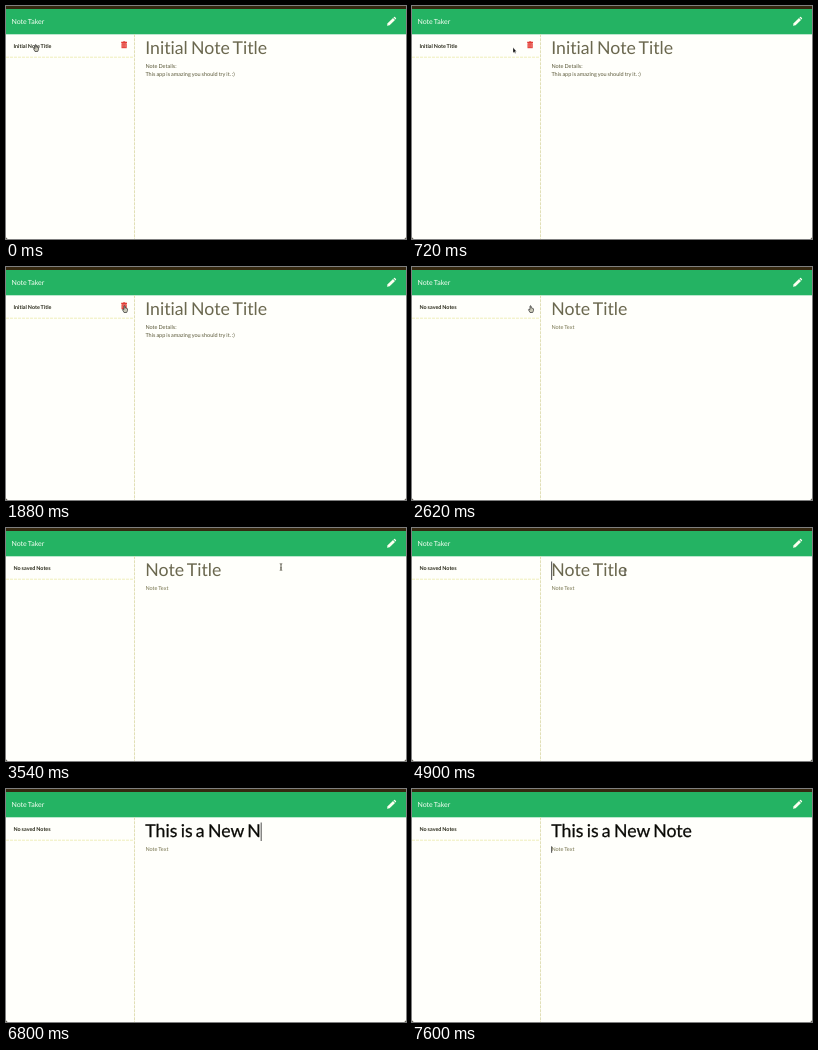
Animation, 400 px wide and 233 px high, one loop 8000 ms. Source, as an HTML page:

```html
<!DOCTYPE html>
<html lang="en">
<head>
<meta charset="utf-8">
<title>Note Taker</title>
<style>
  html, body { margin: 0; width: 100%; height: 100%; overflow: hidden; background: #fffffb; }
  svg { display: block; width: 100vw; height: 100vh; }
  text {
    font-family: Lato, sans-serif; font-variant-ligatures: none; white-space: pre;
    word-spacing: -.07em; text-rendering: geometricPrecision;
  }
  .brand { font-size: 7px; fill: #f6fff4; }
  .item { font-size: 5.4px; font-weight: 700; fill: #2b2b1c; }
  .title { font-size: 17.7px; fill: #6b684f; }
  .title.typed { fill: #0a0a06; stroke: #0a0a06; stroke-width: .25; }
  .body { font-size: 5.5px; fill: #5a5838; }
  .hint { fill: #77744f; }
  .caret { fill: #222; }
</style>
</head>
<body>
<svg viewBox="0 0 400 233" preserveAspectRatio="none">
  <rect width="400" height="233" fill="#1d1608"/>
  <path d="M0 3H400V231Q400 233 398 233H2Q0 233 0 231Z" fill="#fffffb"/>
  <rect width="400" height="3" fill="#352810"/>
  <rect y="3" width="400" height="25.3" fill="#24b363"/>
  <text class="brand" x="5.4" y="18.2">Note Taker</text>
  <g id="pencil" fill="#fcfff0">
    <path d="M381 19.8L381.6 17.2L387 11.9L389 13.9L383.6 19.2Z"/>
    <path d="M387.5 11.4L388 10.9Q388.5 10.5 389 11L389.9 11.9Q390.4 12.4 390 12.9L389.5 13.4Z"/>
  </g>

  <path d="M0 51.2H128" stroke="#efedb4" stroke-width=".9" stroke-dasharray="3 1"/>
  <path d="M128.5 28.3V233" stroke="#dedcae" stroke-width=".9" stroke-dasharray="3 1"/>
  <text class="item" id="item" x="7.5" y="41.6"></text>
  <g id="trash" fill="#e23a34">
    <path d="M115.2 35.8H117L117.4 35.2H119L119.4 35.8H121V37H115.2Z"/>
    <path d="M115.5 37.2H120.7V42.2H115.5Z"/>
    <path d="M116.8 38.2V41.4M118.1 38.2V41.4M119.4 38.2V41.4" stroke="#ffc9bd" stroke-width=".4"/>
  </g>

  <text class="title" id="title" x="139.3" y="48.3"></text>
  <text class="body" id="line1" x="139.4" y="62.3"></text>
  <text class="body" id="line2" x="139.4" y="70.2">This app is amazing you should try it. :)</text>
  <rect class="caret" id="caret" width=".8"/>

  <g id="pointer">
    <path id="arrow" d="M0 -2.5V3L1.2 1.9L2 3.6L2.8 3.2L2 1.6H3.5Z" fill="#111" stroke="#fff" stroke-width=".3"/>
    <path id="hand" d="M-1 -3Q-.4 -3.6 .1 -3V-1Q1 -1.5 1.3 -.8Q2.3 -1 2.5 0V1.6L1.7 3.5H-1L-2.5 .8Q-2.5 -.3 -1 .5Z"
          fill="#c9c8b8" stroke="#333" stroke-width=".7"/>
    <path id="beam" d="M-1.2 -3.3Q0 -3.3 0 -2.6Q0 -3.3 1.2 -3.3M0 -2.6V2.6M-1.2 3.3Q0 3.3 0 2.6Q0 3.3 1.2 3.3M-.7 .9H.7"
          fill="none" stroke="#4a4838" stroke-width=".9"/>
  </g>
</svg>
<script>
  const LOOP = 8000, DELETE = 2100, FOCUS = 3900, TYPE = 5040, TAB = 7600;
  const PHRASE = 'This is a New Note';
  // One key press time per character of PHRASE
  const KEYS = [5040, 5220, 5360, 5440, 5520, 5680, 5760, 5840, 5940, 6060,
                6420, 6500, 6580, 6660, 6800, 6900, 6980, 7080];
  // Pointer path: time, x, y
  const PATH = [[0, 30, 42], [820, 104, 44], [1140, 127, 46], [1240, 127, 46],
                [1640, 119, 42], [2980, 119, 42], [3180, 275, 39], [3560, 275, 39],
                [3860, 213, 44], [LOOP, 213, 44]];
  const el = {};
  document.querySelectorAll('[id]').forEach(n => el[n.id] = n);

  const show = (node, on) => node.setAttribute('visibility', on ? 'visible' : 'hidden');
  const setText = (node, s) => { if (node.textContent !== s) node.textContent = s; };
  const ease = p => p * p * (3 - 2 * p);

  function pointerAt(t) {
    const i = PATH.findIndex(p => p[0] > t);
    const [t0, x0, y0] = PATH[i - 1], [t1, x1, y1] = PATH[i];
    const p = ease((t - t0) / (t1 - t0));
    return [x0 + (x1 - x0) * p, y0 + (y1 - y0) * p];
  }

  function drawPointer(t) {
    const [x, y] = pointerAt(t), visible = t < TYPE;
    const beam = x > 131;
    const hand = !beam && (x < 50 || (x < 122 && x > 113));
    el.pointer.setAttribute('transform', `translate(${x} ${y})`);
    show(el.arrow, visible && !beam && !hand);
    show(el.hand, visible && hand);
    show(el.beam, visible && beam);
  }

  function drawCaret(t, typed) {
    const inBody = t >= TAB;
    const lastKey = Math.max(FOCUS, ...KEYS.filter(k => k <= t));
    const lit = inBody || Math.floor((t - lastKey) / 500) % 2 === 0;
    const width = typed ? el.title.getComputedTextLength() : 0;
    el.caret.setAttribute('x', 139.3 + (inBody ? 0 : width));
    el.caret.setAttribute('y', inBody ? 57.3 : 33.5);
    el.caret.setAttribute('height', inBody ? 6.5 : 18.5);
    show(el.caret, t >= FOCUS && lit);
  }

  function draw(now) {
    const t = now % LOOP, saved = t < DELETE;
    const typed = PHRASE.slice(0, KEYS.filter(k => k <= t).length);
    setText(el.item, saved ? 'Initial Note Title' : 'No saved Notes');
    setText(el.title, saved ? 'Initial Note Title' : typed || 'Note Title');
    setText(el.line1, saved ? 'Note Details:' : 'Note Text');
    el.title.classList.toggle('typed', typed !== '');
    el.line1.classList.toggle('hint', !saved);
    show(el.line2, saved);
    show(el.trash, saved);
    drawPointer(t);
    drawCaret(t, typed);
  }

  function tick() {
    draw(performance.now());
    requestAnimationFrame(tick);
  }
  tick();
</script>
</body>
</html>
```
